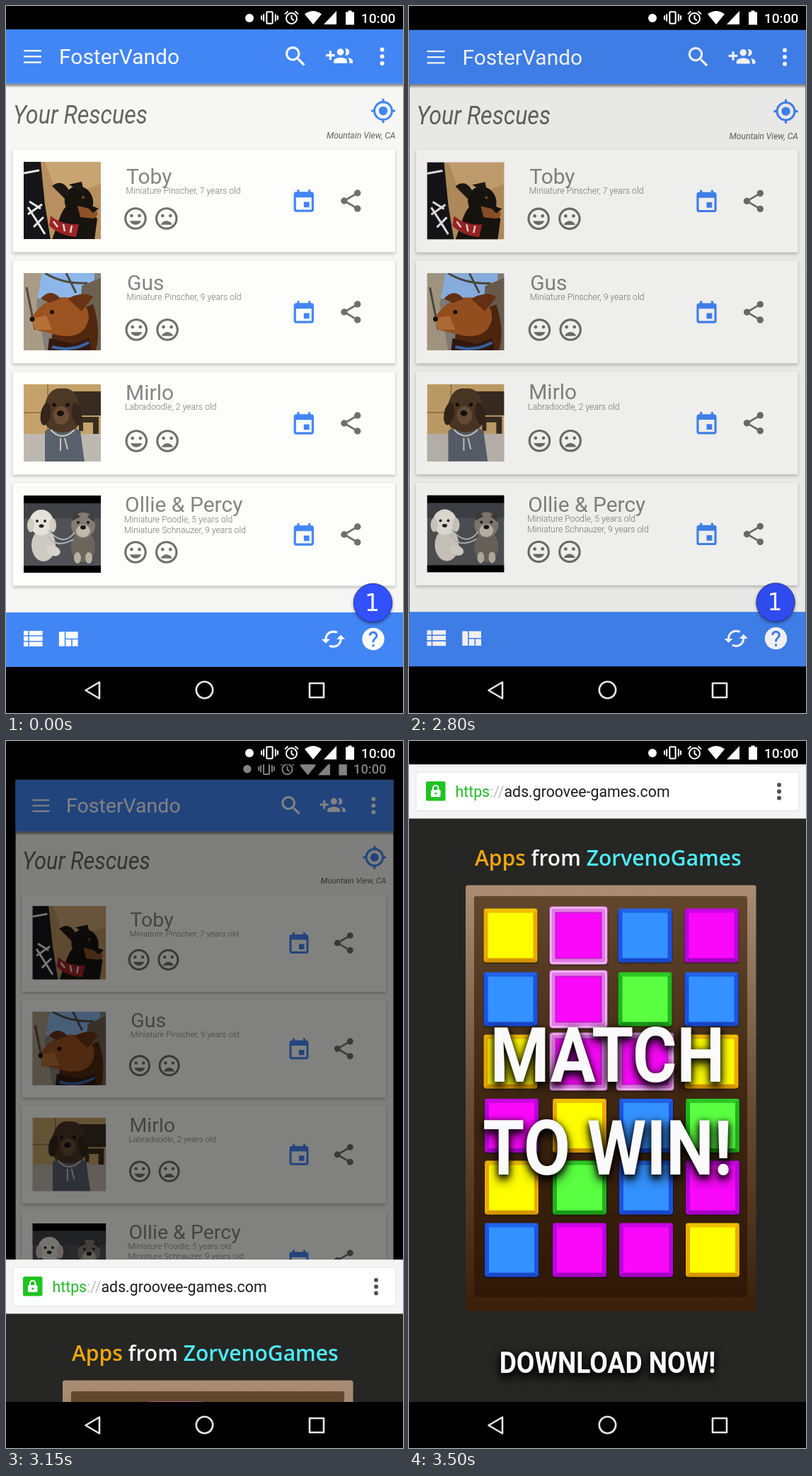
An HTML page that plays this animation: 561x998 px, repeating every 6100 ms.

```html
<!DOCTYPE html>
<html lang="en">
<head>
<meta charset="utf-8">
<title>Rescue list</title>
<style>
html, body { margin: 0; width: 100%; height: 100%; overflow: hidden; background: #000; }
svg { display: block; width: 100vw; height: 100vh; }
text { font-family: Roboto, "Open Sans", sans-serif; white-space: pre; }
.card { fill: #fdfdfb; filter: drop-shadow(0 2px 2px rgba(0,0,0,.25)); }
.name { font-size: 30px; fill: #858585; }
.note { font-size: 12.2px; font-weight: 300; fill: #747474; }
.big { font-weight: 700; fill: #fafafa; text-anchor: middle;
  filter: drop-shadow(0 3px 5px rgba(0,0,0,.9)) drop-shadow(0 5px 7px rgba(0,0,0,.8)); }
.badge { filter: drop-shadow(0 2px 2px rgba(0,0,0,.4)); }
</style>
</head>
<body>
<svg id="stage" viewBox="0 0 561 998" preserveAspectRatio="none"></svg>
<script>
const BLUE = '#4285f4', GREY = '#6f6f6f';

const PATHS = {
  search: 'M15.5 14h-.79l-.28-.27C15.41 12.59 16 11.11 16 9.5 16 5.91 13.09 3 9.5 3S3 5.91 3 9.5 5.91 16 9.5 16c1.61 0 3.09-.59 4.23-1.57l.27.28v.79l5 4.99L20.49 19l-4.99-5zm-6 0C7.01 14 5 11.99 5 9.5S7.01 5 9.5 5 14 7.01 14 9.5 11.99 14 9.5 14z',
  group: 'M8 10H5V7H3v3H0v2h3v3h2v-3h3v-2zm10 1c1.66 0 2.99-1.34 2.99-3S19.66 5 18 5c-.32 0-.63.05-.91.14.57.81.9 1.79.9 2.86s-.34 2.04-.9 2.86c.28.09.59.14.91.14zm-5 0c1.66 0 2.99-1.34 2.99-3S14.66 5 13 5c-1.66 0-3 1.34-3 3s1.34 3 3 3zm6.62 2.16c.83.73 1.38 1.66 1.38 2.84v2h3v-2c0-1.54-2.37-2.49-4.38-2.84zM13 13c-2 0-6 1-6 3v2h12v-2c0-2-4-3-6-3z',
  event: 'M17 12h-5v5h5v-5zM16 1v2H8V1H6v2H5c-1.11 0-1.99.9-1.99 2L3 19c0 1.1.89 2 2 2h14c1.1 0 2-.9 2-2V5c0-1.1-.9-2-2-2h-1V1h-2zm3 18H5V8h14v11z',
  list: 'M4 14h4v-4H4v4zm0 5h4v-4H4v4zM4 9h4V5H4v4zm5 5h12v-4H9v4zm0 5h12v-4H9v4zM9 5v4h12V5H9z',
  quilt: 'M10 18h5v-6h-5v6zm-6 0h5V5H4v13zm12 0h5v-6h-5v6zM10 5v6h11V5H10z',
  sync: 'M19 8l-4 4h3c0 3.31-2.69 6-6 6-1.01 0-1.97-.25-2.8-.7l-1.46 1.46C8.97 19.54 10.43 20 12 20c4.42 0 8-3.58 8-8h3l-4-4zM6 12c0-3.31 2.69-6 6-6 1.01 0 1.97.25 2.8.7l1.46-1.46C15.03 4.46 13.57 4 12 4c-4.42 0-8 3.58-8 8H1l4 4 4-4H6z',
  help: 'M12 2C6.48 2 2 6.48 2 12s4.48 10 10 10 10-4.48 10-10S17.52 2 12 2zm1 17h-2v-2h2v2zm2.07-7.75l-.9.92C13.45 12.9 13 13.5 13 15h-2v-.5c0-1.1.45-2.1 1.17-2.83l1.24-1.26c.37-.36.59-.86.59-1.41 0-1.1-.9-2-2-2s-2 .9-2 2H8c0-2.21 1.79-4 4-4s4 1.79 4 4c0 .88-.36 1.68-.93 2.25z',
  smile: 'M12 17.5c2.33 0 4.31-1.46 5.11-3.5H6.89c.8 2.04 2.78 3.5 5.11 3.5z',
  frown: 'M12 14c-2.33 0-4.31 1.46-5.11 3.5h10.22c-.8-2.04-2.78-3.5-5.11-3.5z'
};

const rect = (x, y, w, h, fill, more = '') =>
  `<rect x="${x}" y="${y}" width="${w}" height="${h}" fill="${fill}" ${more}/>`;
const circle = (x, y, r, fill, more = '') =>
  `<circle cx="${x}" cy="${y}" r="${r}" fill="${fill}" ${more}/>`;
const oval = (x, y, rx, ry, fill, turn = 0) =>
  `<ellipse cx="${x}" cy="${y}" rx="${rx}" ry="${ry}" fill="${fill}" transform="rotate(${turn} ${x} ${y})"/>`;
const path = (d, fill, more = '') => `<path d="${d}" fill="${fill}" ${more}/>`;
const line = (d, color, width) => path(d, 'none', `stroke="${color}" stroke-width="${width}"`);
const text = (x, y, str, more) => `<text x="${x}" y="${y}" ${more}>${str}</text>`;
// Places a 24-unit icon by its centre
const at = (x, y, body, s = 1.57) =>
  `<g transform="translate(${x} ${y}) scale(${s}) translate(-12 -12)">${body}</g>`;
const icon = (x, y, key, fill = '#fff', s) => at(x, y, path(PATHS[key], fill), s);
// Condensed face
const narrow = (x, y, str, more) =>
  `<g transform="translate(${x} ${y}) scale(.885 1)">${text(0, 0, str, more)}</g>`;
const fade = (id, ...stops) =>
  `<linearGradient id="${id}" x1="0" y1="0" x2="0" y2="1">${stops.map(([o, c, a = 1]) =>
    `<stop offset="${o}" stop-color="${c}" stop-opacity="${a}"/>`).join('')}</linearGradient>`;
const dots = (x, ys, fill) => ys.map(y => circle(x, y, 3, fill)).join('');

const statusBar = () => rect(0, 0, 561, 33, '#000') +
  circle(344, 17, 6, '#fff') +
  at(372.5, 16.5, [[0, 9, 6], [3, 7, 10], [19, 7, 10], [22, 9, 6]]
    .map(([x, y, h]) => rect(x, y, 2, h, '#fff')).join('') +
    rect(8, 4, 8, 16, 'none', 'stroke="#fff" stroke-width="2" rx="1"'), 1.04) +
  circle(403.5, 17.5, 7.5, 'none', 'stroke="#fff" stroke-width="2"') +
  line('M403.5 13v5l3.5 2.3M394 11.5l4.5-4M413 11.5l-4.5-4', '#fff', 2) +
  path('M422 11.5Q434 2.5 446 11.5L434 26Z', '#fff') +
  path('M467 7V26H449Z', '#fff') +
  path('M480 8.5h3.5v-2h5v2h3.5v18h-12z', '#fff') +
  text(550.5, 23.8, '10:00', 'text-anchor="end" font-size="19.2" font-weight="500" fill="#fff"');

const gps = at(533, 148,
  circle(12, 12, 4, BLUE) +
  circle(12, 12, 8, 'none', `stroke="${BLUE}" stroke-width="2"`) +
  line('M12 1v3M12 20v3M1 12h3M20 12h3', BLUE, 2), 1.55);

const face = (x, y, mouth) => at(x, y,
  circle(12, 12, 9, 'none', `stroke="${GREY}" stroke-width="2"`) +
  circle(8.5, 9.5, 1.5, GREY) + circle(15.5, 9.5, 1.5, GREY) + path(PATHS[mouth], GREY), 1.58);

const share = y => at(487.3, y,
  line('M18 5L6 12l12 7', GREY, 1.7) +
  [[18, 5], [6, 12], [18, 19]].map(([a, b]) => circle(a, b, 3, GREY)).join(''));

const photos = [
  rect(0, 0, 110, 110, '#b8905f') +
  path('M30 0H110V30Q70 50 42 32Z', '#c9a473') +
  path('M0 0H24L30 60 38 110H0Z', '#15151a') +
  line('M0 16l22-4M8 56l16 10M6 74l20-14M14 92l14-14M6 64l18 28M20 86l10 16', '#e9e8e4', 3) +
  path('M52 76Q62 52 78 62L104 80 100 110H40Z', '#17130f') +
  oval(78, 56, 20, 22, '#17130f', -20) +
  path('M40 34Q56 22 66 44L58 52Z', '#1c1713') + path('M64 32L82 28 86 46Z', '#1c1713') +
  path('M76 62L102 68Q108 76 98 80L80 78Z', '#8e5226') +
  path('M82 56L106 66 98 72Z', '#17130f') + circle(84, 50, 2.2, '#6b4526') +
  path('M38 76Q54 90 78 88L74 106Q50 104 36 90Z', '#9c2426') +
  line('M42 84l6 8M56 88l2 10M68 90l-2 10', '#e6d8d0', 2.5),

  rect(0, 0, 110, 110, '#85807a') +
  path('M14 0H100V26Q60 46 14 34Z', '#8db7ea') +
  path('M0 0H26L18 44 30 110H0Z', '#a99c87') +
  path('M82 18L110 6V110H76Z', '#6c6051') +
  line('M30 0Q56 16 90 14M60 0l14 28M4 20l12 60', '#51493f', 3) +
  path('M42 66L98 44Q110 80 102 110H38Z', '#51270f') +
  path('M10 64Q28 36 56 34 92 34 92 64 86 94 50 88L16 80Z', '#9c5322') +
  path('M24 36Q38 20 52 36L36 42Z', '#6a3315') + path('M62 36Q86 24 98 34L82 54Z', '#6a3315') +
  path('M10 64L32 60 40 80 16 80Z', '#b67137') +
  circle(12, 65, 3.5, '#16100d') + circle(40, 55, 3, '#1a110c') +
  path('M36 92L70 100 92 92 96 110H34Z', '#321a10') + line('M40 104Q66 112 92 98', '#3b65a6', 4),

  rect(0, 0, 110, 110, '#c5a269') +
  line('M34 0V70M0 40H34', '#8e6d3e', 1.5) +
  path('M0 70H110V110H0Z', '#bdb8b0') +
  path('M66 10H110V24H66ZM76 24H110V44H76ZM78 46H106V70H98V54H84V66H78Z', '#382c22') +
  path('M30 66Q54 50 80 66L86 110H30Z', '#59616d') +
  path('M30 28Q36 4 54 6 74 4 78 28 84 60 70 64 54 72 40 64 24 60 30 28Z', '#4d3725') +
  oval(31, 42, 7, 16, '#35251a', 10) + oval(75, 42, 7, 16, '#35251a', -10) +
  oval(53, 44, 11, 13, '#6b4e35') + oval(52, 41, 5, 4, '#17110d') +
  circle(43, 29, 2.8, '#17110d') + circle(62, 29, 2.8, '#17110d') +
  line('M38 64Q54 82 72 64M52 76v18M58 76l4 16', '#ccc8be', 2),

  rect(0, 0, 110, 110, '#505155') + rect(0, 10, 110, 22, '#404247') +
  oval(28, 70, 17, 23, '#cfcac1') + oval(42, 78, 10, 7, '#d8d3ca', 20) +
  oval(25, 38, 17, 18, '#e6e2da') + oval(10, 42, 5, 10, '#d2ccc2') + oval(41, 42, 5, 10, '#d2ccc2') +
  circle(19, 36, 2, '#222') + circle(30, 36, 2, '#222') + oval(25, 43, 3.5, 2.5, '#222') +
  oval(84, 72, 17, 22, '#6c655c') + oval(84, 42, 17, 18, '#837b71') +
  path('M68 36L72 22 80 30ZM90 30L98 22 100 38Z', '#413d39') +
  oval(84, 50, 10, 9, '#bfb7aa') + oval(84, 45, 4, 3, '#1a1816') +
  circle(77, 38, 2, '#1a1816') + circle(91, 38, 2, '#1a1816') +
  oval(76, 88, 5, 8, '#b7afa2') + oval(92, 88, 5, 8, '#b7afa2') +
  line('M34 56Q44 76 70 62M34 48Q56 74 72 52', '#b6bac2', 1.8) +
  rect(0, 0, 110, 11, '#000') + rect(0, 99, 110, 11, '#000')
];

// name, name x, baseline, notes, first note baseline, note x, face x
const pets = [
  ['Toby', 170, 251, ['Miniature Pinscher, 7 years old'], 265, 169.5, 183],
  ['Gus', 171, 400.5, ['Miniature Pinscher, 9 years old'], 414.5, 170.5, 184.3],
  ['Mirlo', 169, 555.5, ['Labradoodle, 2 years old'], 570, 168, 184.3],
  ['Ollie &amp; Percy', 168, 714, ['Miniature Poodle, 5 years old', 'Miniature Schnauzer, 9 years old'], 729, 167, 183]
];

const petCard = ([name, x, y, notes, noteY, noteX, faceX], i) => {
  const top = 202.5 + i * 157, mid = top + 72.5;
  return `<rect class="card" x="9.5" y="${top}" width="540.5" height="145"/>` +
    `<svg x="25" y="${top + 17.5}" width="109" height="109">${photos[i]}</svg>` +
    text(x, y, name, 'class="name"') +
    notes.map((n, k) => text(noteX, noteY + k * 15, n, 'class="note"')).join('') +
    face(faceX, mid + 25, 'smile') + face(faceX + 43.8, mid + 25, 'frown') +
    icon(420.8, mid + 1.5, 'event', BLUE) + share(mid);
};

const appScreen = () => statusBar() +
  rect(0, 33, 561, 900, '#f6f6f4') +
  rect(0, 109.5, 561, 6, 'url(#shade)') + rect(0, 33, 561, 76.5, BLUE) +
  [62, 70.2, 78.4].map(y => rect(25, y, 25, 2.3, '#fff')).join('') +
  text(75, 82, 'FosterVando', 'font-size="30" fill="#fff"') +
  icon(409.2, 71.2, 'search') + icon(471, 71.2, 'group', '#fff', 1.58) +
  dots(531.5, [61.5, 71.2, 81], '#fff') +
  narrow(10, 166, 'Your Rescues', 'font-size="36.5" font-style="italic" fill="#646464"') +
  gps +
  text(550.5, 187, 'Mountain View, CA', 'text-anchor="end" font-size="12.1" font-style="italic" fill="#606060"') +
  pets.map(petCard).join('') +
  rect(0, 856, 561, 77, BLUE) +
  icon(37.5, 893, 'list') + icon(87.5, 894.3, 'quilt') + icon(462.5, 893.7, 'sync', '#fff', 1.51) +
  circle(519, 894, 25, '#fff', 'id="ripple" opacity="0"') + icon(519, 893.5, 'help') +
  `<g class="badge">${circle(518.5, 842.5, 27.2, '#3250fd', 'stroke="#24389c" stroke-width="1"')}</g>` +
  `<text x="517.5" y="854" text-anchor="middle" font-size="33" fill="#fff" style="font-family:'DejaVu Sans',sans-serif">1</text>`;

const TILE = {
  Y: ['#fffd00', '#eca900', '#b87c00'],
  M: ['#fa08fa', '#b904dc', '#8a00a8'],
  B: ['#3392ff', '#1c52e4', '#143aa8'],
  G: ['#59ff40', '#20b41c', '#157a12']
};
const GRID = ['YmBM', 'BmGB', 'YmmY', 'MYBG', 'YGBM', 'BMMY'];
const COLS = [143.5, 239.5, 333.5, 427.5], ROWS = [274.5, 364.5, 452.5, 543, 630.5, 718.5];

// Lower case marks a glowing tile
const tile = (key, row, col) => {
  const [front, edge, low] = TILE[key.toUpperCase()];
  const x = COLS[col] + (row > 2 ? 1.5 : 0), y = ROWS[row];
  const glow = key === 'm';
  const h = glow ? 41 : 38;
  const bevel = (s, color, alpha) =>
    path(`M${x - h} ${y + s * h}L${x - 32} ${y + s * 32}H${x + 32}L${x + h} ${y + s * h}Z`, color, `opacity="${alpha}"`);
  return rect(x - h - 1, y - h + 2, 2 * h + 2, 2 * h, '#000', 'rx="4" opacity=".35"') +
    rect(x - h, y - h, 2 * h, 2 * h, glow ? '#e27be6' : edge, 'rx="4"') +
    (glow ? rect(x - h + 2, y - h + 2, 2 * h - 4, 2 * h - 4, 'none', 'rx="4" stroke="#f6c9f3" stroke-width="2.5" opacity=".8"')
      : bevel(1, low, .45) + bevel(-1, front, .25)) +
    rect(x - 32, y - 32, 64, 64, front, glow ? 'stroke="#c81ad0" stroke-width="2"' : '');
};

const adPage = () =>
  rect(0, 33, 561, 77, '#f4f4f4') +
  rect(10, 44, 541, 54.5, '#fff', 'rx="1" stroke="#e2e2e2"') +
  rect(24, 57, 27.5, 27.5, '#20c322', 'rx="2.5"') +
  rect(31, 69, 13.5, 10, '#fff', 'rx="1.5"') + circle(37.7, 74, 1.6, '#20c322') +
  line('M34 69.5v-3a3.7 3.7 0 0 1 7.4 0v3', '#fff', 2) +
  text(65.5, 79, '<tspan fill="#1fb922">https</tspan><tspan fill="#bdbdbd">://</tspan>ads.groovee-games.com', 'font-size="21.3" fill="#1c1c1c"') +
  dots(523, [62, 71.3, 80.5], '#505050') +
  rect(0, 109.5, 561, 823.5, '#262624') +
  `<text x="93" y="176" font-size="30" font-weight="600" fill="#fafafa" style="font-family:'Open Sans','Noto Sans',sans-serif"><tspan fill="#f2a60c">Apps</tspan> from <tspan fill="#4deefa">ZorvenoGames</tspan></text>` +
  rect(80, 203.5, 410.5, 601, 'url(#frame)', 'rx="3"') +
  rect(92, 219, 386, 566, 'url(#well)', 'rx="3"') +
  GRID.map((row, r) => [...row].map((k, c) => tile(k, r, c)).join('')).join('') +
  narrow(280.5, 481, 'MATCH', 'class="big" font-size="108"') +
  narrow(280.5, 612, 'TO WIN!', 'class="big" font-size="108"') +
  narrow(280.5, 892, 'DOWNLOAD NOW!', 'class="big" font-size="42"');

const navBar = rect(0, 933, 561, 65, '#000') +
  `<g fill="none" stroke="#e6e6e6" stroke-width="2.6" stroke-linejoin="round">
    <path d="M112.5 966L132 954.5V977.5Z"/><circle cx="280.5" cy="965.5" r="11.7"/>
    <rect x="429" y="956" width="20" height="20"/></g>`;

document.getElementById('stage').innerHTML =
  `<defs>${fade('shade', [0, '#000', .55], [1, '#000', 0])}
  ${fade('frame', [0, '#aa8d74'], [.5, '#6b4d37'], [1, '#3c1f0b'])}
  ${fade('well', [0, '#62472d'], [.5, '#3f2711'], [1, '#2f1806'])}</defs>` +
  rect(0, 0, 561, 998, '#000') +
  `<g id="app">${appScreen()}</g>` +
  rect(0, 0, 561, 998, '#000', 'id="dim" opacity="0"') +
  `<g id="sheet">${adPage()}</g>` + statusBar() + navBar;

const [app, dim, sheet, ripple] = ['app', 'dim', 'sheet', 'ripple'].map(id => document.getElementById(id));

const LOOP = 6100, STEP = 50;
const SCALE = [[2550, 1], [2700, .9995], [2800, .998], [2850, .993], [2900, .986], [2950, .9775], [3050, .962], [3150, .9515], [3200, .95]];
const DIM = [[2550, 0], [2700, .02], [2800, .06], [2950, .22], [3050, .36], [3150, .49], [3200, .52]];
const RIPPLE = [[2099, 0], [2100, .13], [2150, .12], [2200, .06], [2250, 0]];

function track(keys, t) {
  const i = keys.findIndex(k => k[0] > t);
  if (i === 0) return keys[0][1];
  if (i < 0) return keys[keys.length - 1][1];
  const [t0, a] = keys[i - 1], [t1, b] = keys[i];
  return a + (b - a) * (t - t0) / (t1 - t0);
}

function draw(t) {
  app.setAttribute('transform', `translate(280.5 482.5) scale(${track(SCALE, t)}) translate(-280.5 -482.5)`);
  dim.setAttribute('opacity', track(DIM, t));
  ripple.setAttribute('opacity', track(RIPPLE, t));
  ripple.setAttribute('r', 25 + Math.min(2, Math.max(0, (t - 2100) / 50)));
  // Sheet rises with a quadratic slow-down
  const left = Math.min(1, Math.max(0, (3499 - t) / 396));
  sheet.setAttribute('transform', `translate(0 ${Math.round(900 * left * left)})`);
  sheet.setAttribute('visibility', left < 1 ? 'visible' : 'hidden');
}

const start = performance.now();
function tick() {
  const t = (performance.now() - start) % LOOP;
  draw(Math.floor(t / STEP) * STEP);
  requestAnimationFrame(tick);
}
tick();
</script>
</body>
</html>
```
